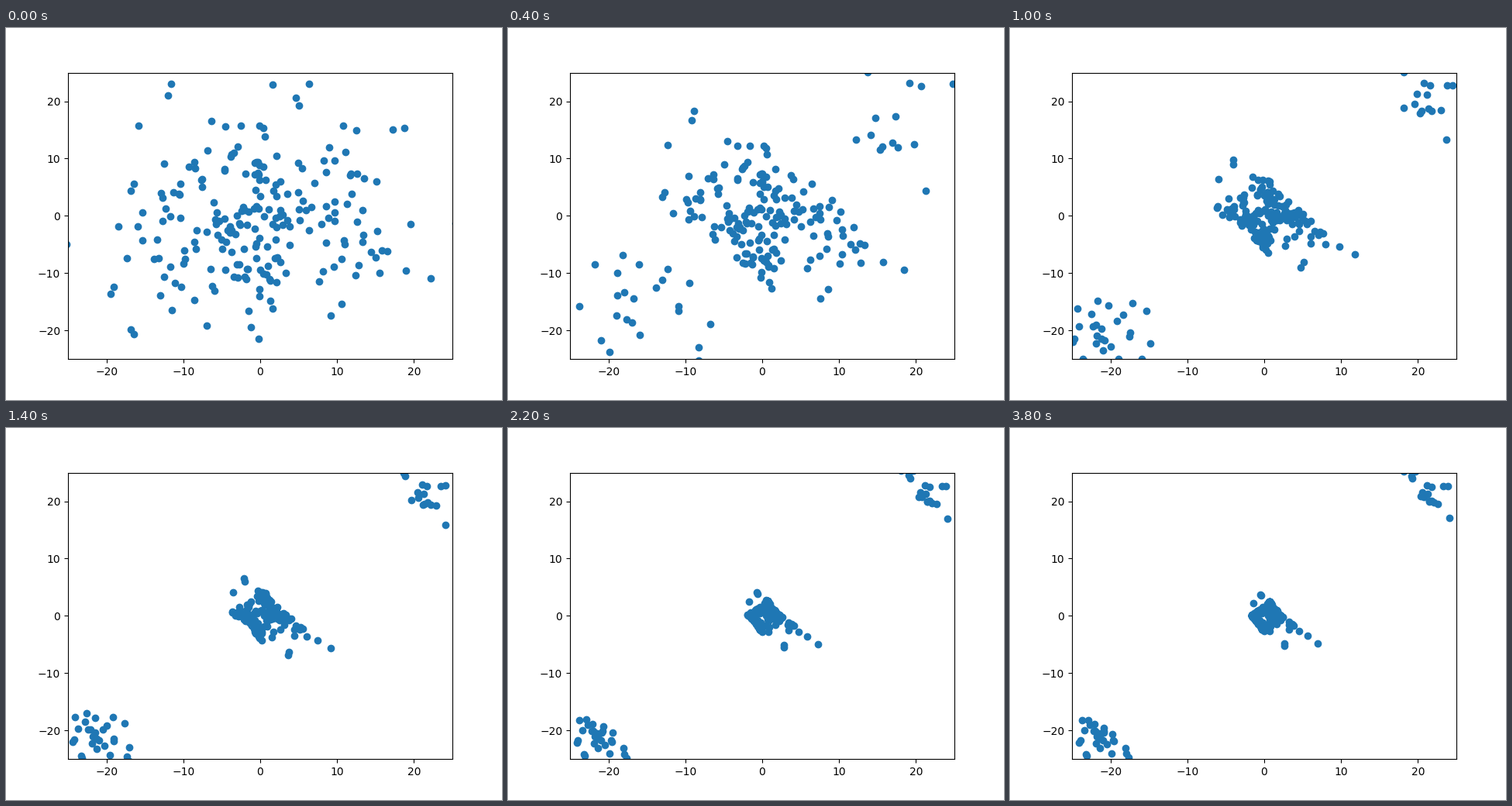
Animation of 640x480 px, one loop 4 s. Source, as a matplotlib script:

```python
import numpy as np
import matplotlib.pyplot as plt
from matplotlib.animation import FuncAnimation

FRAMES = 20
COUNT = 225
rng = np.random.default_rng(7)

# Far points that stay visible as stragglers beside the central cluster
stragglers = [(-11.6, 23), (-12, 21), (-15.8, 15.7), (22.2, -10.9), (19, -9.6),
              (15.5, -10), (9.2, -17.4), (10.6, -15.4), (12.4, -10.4)]


def to_uv(p):
    """Rotate into sum and difference coordinates."""
    return p[:, 0] + p[:, 1], p[:, 0] - p[:, 1]


def to_xy(u, v):
    return np.column_stack([(u + v) / 2, (u - v) / 2])


def settle(t, power):
    """Share of the way travelled after t steps."""
    return 1 - np.exp(-0.0965 * power * t ** 1.54)


def is_corner(u):
    return abs(u - 1.2) > 16


cloud = rng.normal((0, 0.5), 10, (COUNT, 2))
u, v = to_uv(cloud)
cloud = cloud[is_corner(u) | (abs(v) < 23)]
u0, v0 = to_uv(np.vstack([stragglers, cloud]))
corner = is_corner(u0)
side, reach = np.sign(u0), abs(u0)

# The centre folds into a small block with thin tails
fold = np.tanh(v0 / 4)
core_u = 2.4 * np.tanh(u0 / 4) + 0.3 - 0.5 * fold
core_v = (1.9 * fold + 0.2 + 0.6 * np.maximum(0, v0 - 17)
          - 0.2 * np.maximum(0, -v0 - 22))

# Points far along the diagonal gather in two opposite corners
corner_reach = 40.5 + (reach - 16) / 3
v_end = np.where(corner, v0 / 3, core_v)
delay = 3.6 * np.exp(-0.13 * (reach - 18))
power = np.where(corner, 1.25, 1 + 0.3 * np.exp(-(v0 / 16) ** 2))


def positions(t):
    s = settle(t, power)
    inner_u = u0 + (core_u - u0) * s
    left = np.exp(-(t / delay) ** 1.6)
    overshoot = 0.9 * np.maximum(0, reach - 28) * t * np.exp(-0.7 * t)
    outer_u = side * (corner_reach + (reach - corner_reach) * left + overshoot)
    return to_xy(np.where(corner, outer_u, inner_u), v0 + (v_end - v0) * s)


fig, ax = plt.subplots(figsize=(6.4, 4.8), dpi=100)
dots = ax.scatter(*positions(0).T)
ax.set_xlim(-25, 25)
ax.set_ylim(-25, 25)


def update(i):
    dots.set_offsets(positions(float(i)))
    return (dots,)


anim = FuncAnimation(fig, update, frames=FRAMES, interval=200,
                     repeat=True, repeat_delay=0)
plt.show()
```
